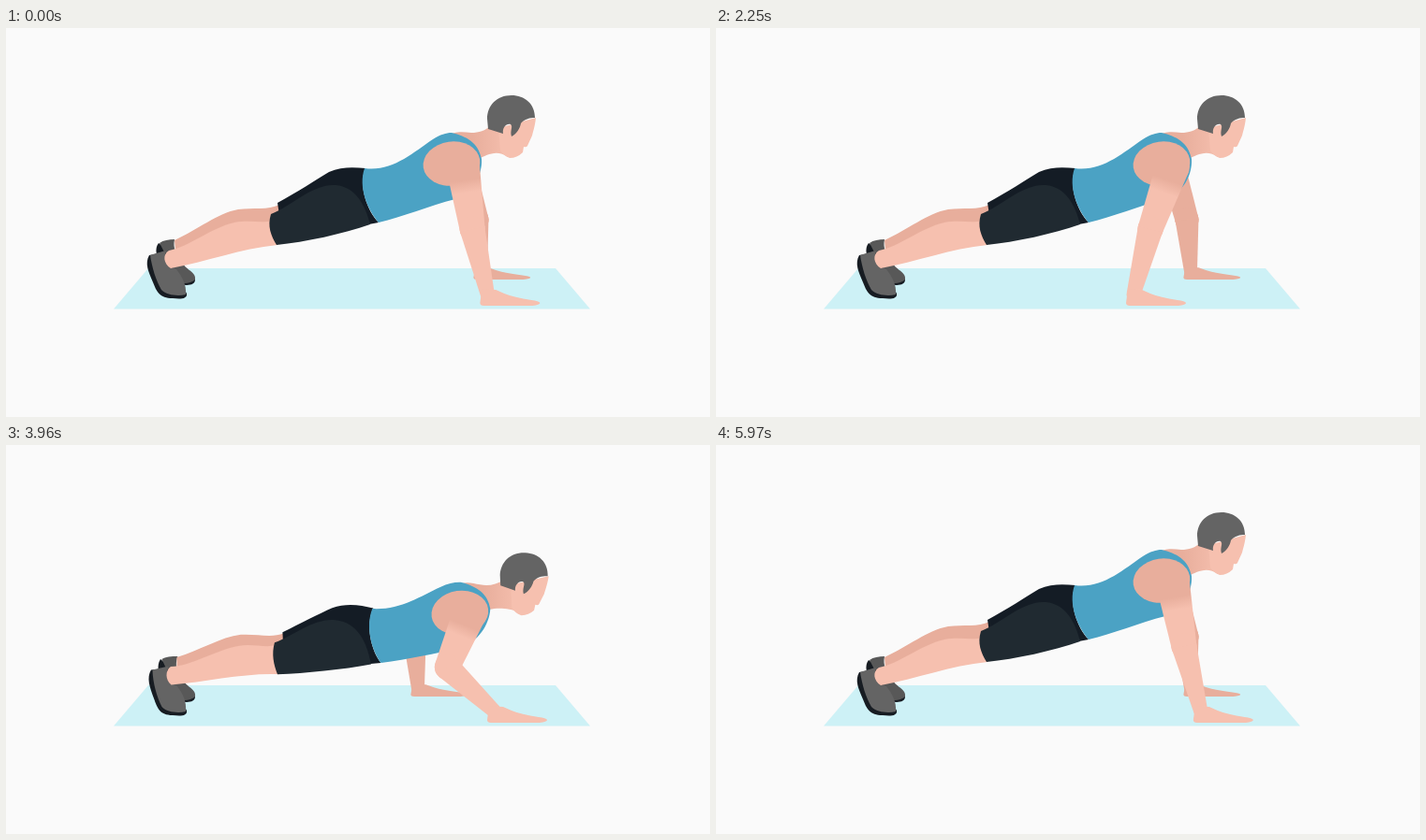
An HTML page with a canvas for the animation above (6000 ms loop, 752x416 px).

```html
<!DOCTYPE html>
<html lang="en">
<head>
<meta charset="utf-8">
<title>Staggered push-ups</title>
<style>
  html, body { margin: 0; width: 100%; height: 100%; overflow: hidden; background: #fafafa; }
  canvas { display: block; }
</style>
</head>
<body>
<canvas id="stage" width="752" height="416"></canvas>
<script>
const ctx = document.getElementById('stage').getContext('2d');
const LOOP = 6000, MOVE = 540, LEAD = 110;
const LIGHT = '#f6c0af', DARK = '#e8ae9c', GREY = '#646464', SOLE = '#171c22';

// Each body part: outline with straight arms, outline at the lowest point.
const parts = {
  farSole: [
    'M163,230 C158,236 161,246 166,256 L186,274 C194,276 202,275 202,269 L182,244 Z',
    'M167,228 C163,236 165,246 168,256 L186,274 C194,276 202,275 202,269 L184,244 Z'],
  farShoe: [
    'M164,230 C168,227 174,226 180,226 C178,236 182,240 184,244 C188,258 204,260 202,269 C198,273 190,274 186,272 Z',
    'M169,228 C172,226 180,226 187,226 C182,236 184,240 186,244 C189,258 204,260 202,269 C198,273 190,274 186,272 Z'],
  farLeg: [
    'M180,227 C204,216 226,198 248,194 C264,192 280,195 292,189 L292,206 L230,222 L181,238 Z',
    'M185,227 C210,224 232,213 254,212 C272,212 288,219 302,214 L302,230 L236,236 L184,240 Z'],
  sole: [
    'M153,243 C148,252 152,260 157,272 C161,282 164,289 178,289 C186,290 194,290 193,284 L180,260 L170,240 Z',
    'M157,238 C152,246 155,258 159,270 C162,280 164,289 178,289 C187,290 194,290 193,284 L181,260 L174,238 Z'],
  shoe: [
    'M154,243 C160,241 166,239 171,238 C168,246 172,256 182,258 C188,266 193,274 192,285 C184,287 172,286 166,280 C160,270 156,256 154,243 Z',
    'M159,238 C164,237 170,236 176,236 C172,246 174,254 183,257 C190,266 193,274 192,285 C184,287 172,286 167,280 C162,268 158,254 159,238 Z'],
  leg: [
    'M174,238 C196,234 218,214 244,208 C260,205 272,209 286,206 L290,232 C250,236 214,250 176,257 C168,252 167,242 174,238 Z',
    'M178,236 C202,238 226,226 252,222 C266,220 278,225 292,223 L293,259 C256,252 216,257 177,256 C172,250 173,240 178,236 Z'],
  hips: [
    'M290,187 C312,175 330,163 345,154 C358,148 372,149 384,150 C376,168 386,196 398,208 C370,214 340,215 320,210 L292,200 Z',
    'M301,214 C318,206 338,199 352,195 C368,191 384,193 401,200 C392,218 394,244 403,259 C370,260 340,250 320,240 L300,222 Z'],
  thigh: [
    'M283,199 C306,190 328,166 352,168 C374,170 384,190 389,210 C360,220 320,229 289,232 C283,222 279,212 283,199 Z',
    'M291,224 C310,218 330,204 352,207 C378,210 388,234 391,260 C360,261 320,260 291,259 C289,248 288,236 291,224 Z'],
  neck: [
    'M472,116 C478,110 488,111 497,112 C505,112 512,110 518,104 L540,110 L536,138 C524,129 512,137 507,139 Z',
    'M493,188 C497,181 508,185 516,188 C526,192 536,190 546,186 L568,198 L562,222 C548,219 534,213 527,214 Z'],
  shirt: [
    'M383,150 C412,154 434,134 456,119 C464,114 470,112 476,112 C492,116 504,122 508,140 C509,156 500,176 480,183 C452,190 424,202 398,208 C386,194 376,170 383,150 Z',
    'M400,201 C430,200 450,191 472,186 C482,183 490,182 498,183 C514,188 526,196 527,212 C524,230 508,248 490,252 C466,257 436,257 403,259 C394,244 392,218 400,201 Z']
};

const FACE = new Path2D('M-14,12 L26,1 C25,10 23,16 22,20 L17,31 Q16,33 13,32 L12,38 Q6,44 -2,44 Q-8,42 -12,36 Z');
const HAIR = new Path2D('M25,1 C25,-14 14,-23 0,-23 C-16,-23 -26,-12 -26,2 L-25,13 L-9,18 C-10,12 -6,7 -1,8 C2,10 -2,15 0,21 C6,18 9,12 10,7 C14,2 20,1 25,1 Z');
const HAND = new Path2D('M-6,-6 L-8,9 Q-8,12 -4,12 L48,12 Q56,11 56,9 Q55,7 47,6 Q28,3 18,-1 L9,-5 Z');

// Elbows are given for a dip of 0, 0.5 and 1, with the hand in front or behind.
const nearArm = {
  shoulder: [[488, 148], [503, 213]], wrist: [[522, 285], [446, 285]],
  front: [[502, 215], [471, 238], [463, 266]],
  back: [[464, 215], [427, 205], [422, 212]],
  radii: [18, 13.5, 7.5], hand: [1, 1], colors: [DARK, LIGHT]
};
const farArm = {
  shoulder: [[485, 140], [498, 196]], wrist: [[507, 260], [440, 260]],
  front: [[503, 205], [455, 222], [450, 243]],
  back: [[470, 205], [436, 205], [440, 191]],
  radii: [14, 12.5, 7], hand: [0.95, 0.75], colors: [DARK, DARK]
};

const mix = (a, b, k) => a + (b - a) * k;
const mixPoint = (a, b, k) => a.map((v, i) => mix(v, b[i], k));
const bend = ([a, m, b], p) => a.map((v, i) =>
  v * (1 - p) * (1 - 2 * p) + m[i] * 4 * p * (1 - p) + b[i] * p * (2 * p - 1));

function ramp(t, start) {
  const u = Math.min(1, Math.max(0, (t - start) / MOVE));
  return (1 - Math.cos(Math.PI * u)) / 2;
}

function mixPath([from, to], k) {
  const ends = to.match(/\d+/g);
  let i = 0;
  return new Path2D(from.replace(/\d+/g, n => mix(+n, +ends[i++], k).toFixed(2)));
}

function part(name, dip, color) {
  ctx.fillStyle = color;
  ctx.fill(mixPath(parts[name], dip));
}

function disc([x, y], r) {
  ctx.beginPath();
  ctx.arc(x, y, r, 0, 2 * Math.PI);
  ctx.fill();
}

function limb(a, b, ra, rb) {
  const angle = Math.atan2(b[1] - a[1], b[0] - a[0]);
  const nx = -Math.sin(angle), ny = Math.cos(angle);
  disc(a, ra);
  disc(b, rb);
  ctx.beginPath();
  ctx.moveTo(a[0] + nx * ra, a[1] + ny * ra);
  ctx.lineTo(b[0] + nx * rb, b[1] + ny * rb);
  ctx.lineTo(b[0] - nx * rb, b[1] - ny * rb);
  ctx.lineTo(a[0] - nx * ra, a[1] - ny * ra);
  ctx.fill();
}

function drawArm(arm, dip, slide) {
  const shoulder = mixPoint(...arm.shoulder, dip);
  const elbow = mixPoint(bend(arm.front, dip), bend(arm.back, dip), slide);
  const wrist = mixPoint(...arm.wrist, slide);
  const [r0, r1, r2] = arm.radii, [top, low] = arm.colors;

  const shade = ctx.createLinearGradient(...shoulder, ...elbow);
  shade.addColorStop(0.22, top);
  shade.addColorStop(0.42, low);
  ctx.fillStyle = shade;
  limb(shoulder, elbow, r0, r1);
  ctx.fillStyle = low;
  limb(elbow, wrist, r1, r2);

  ctx.save();
  ctx.translate(...wrist);
  ctx.scale(...arm.hand);
  ctx.fill(HAND);
  ctx.restore();
}

function drawHead(dip) {
  ctx.save();
  ctx.translate(mix(540, 568, dip), mix(95, 183, dip));
  ctx.rotate(dip * 5 * Math.PI / 180);
  ctx.fillStyle = LIGHT;
  ctx.fill(FACE);
  ctx.fillStyle = GREY;
  ctx.fill(HAIR);
  ctx.restore();
}

function drawNeck(dip) {
  const x = mix(0, 24, dip);
  const shade = ctx.createLinearGradient(498 + x, 0, 540 + x, 0);
  shade.addColorStop(0, DARK);
  shade.addColorStop(1, LIGHT);
  part('neck', dip, shade);
}

function drawShoulder(dip) {
  ctx.fillStyle = DARK;
  ctx.beginPath();
  ctx.ellipse(mix(476, 494, dip), mix(145, 215, dip), 30.5, 23.5, -0.14, 0, 2 * Math.PI);
  ctx.fill();
}

function draw(time) {
  const t = (time + LEAD) % LOOP;
  const nearSlide = ramp(t, 0) - ramp(t, 2520);
  const farSlide = ramp(t, 3030) - ramp(t, 5460);
  const dip = ramp(t, 774) - ramp(t, 1715) + ramp(t, 3804) - ramp(t, 4790);

  ctx.fillStyle = '#fafafa';
  ctx.fillRect(0, 0, 752, 416);
  ctx.fillStyle = '#cdf1f6';
  ctx.fill(new Path2D('M152,257 H587 L624,300.5 H115 Z'));

  drawArm(farArm, dip, farSlide);
  part('farSole', dip, SOLE);
  part('farShoe', dip, '#585858');
  part('farLeg', dip, DARK);
  part('sole', dip, SOLE);
  part('shoe', dip, GREY);
  part('leg', dip, LIGHT);
  part('hips', dip, '#141c25');
  part('thigh', dip, '#202a31');
  drawNeck(dip);
  part('shirt', dip, '#4ba2c4');
  drawHead(dip);
  drawShoulder(dip);
  drawArm(nearArm, dip, nearSlide);
}

const start = performance.now();
function tick() {
  draw(performance.now() - start);
  requestAnimationFrame(tick);
}
tick();
</script>
</body>
</html>
```
